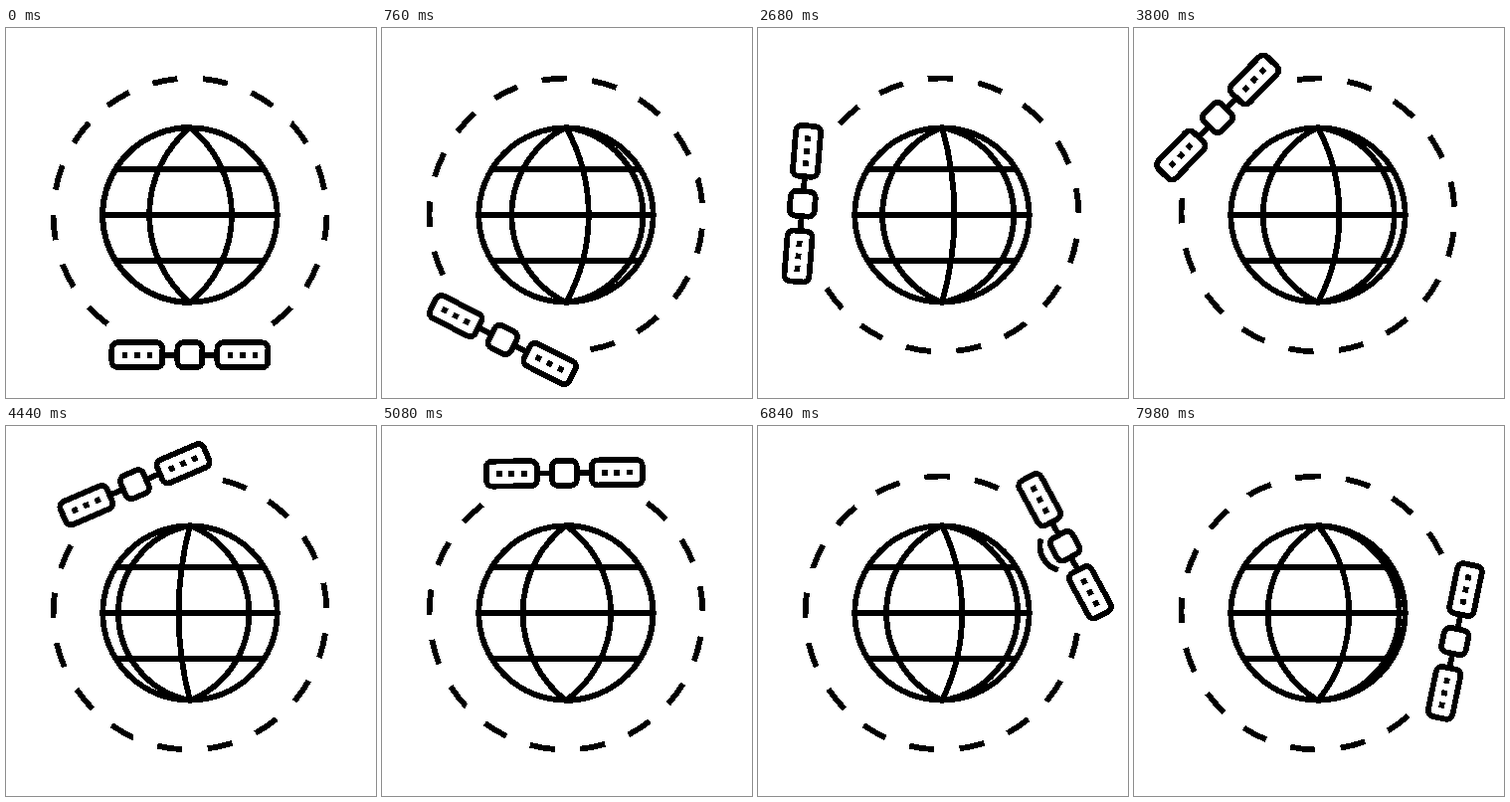
Animation, 372 px wide and 372 px high, one loop 8 s. Source, as an HTML page:

```html
<!DOCTYPE html>
<html lang="en">
<head>
<meta charset="utf-8">
<title>Satellite orbit</title>
<style>
  html, body { margin: 0; width: 100%; height: 100%; overflow: hidden; background: #fff; }
  svg {
    display: block; width: 100%; height: 100%;
    fill: none; stroke: #000; stroke-width: 5.8; shape-rendering: crispEdges;
  }
</style>
</head>
<body>
<svg viewBox="-185 -188 372 372">
  <circle r="87.7"/>
  <path d="M-75-46H75M-88 0H88M-75 46H75"/>
  <path id="meridians"/>
  <g id="orbit">
    <path d="M-82.9 109.7A137.5 137.5 0 1 1 82.9 109.7" pathLength="27" stroke-dasharray="1 1"/>
    <g transform="translate(0 140.7)">
      <path id="signal" d="M-18-17.4A25 25 0 0 1 18-17.4"/>
      <rect x="-12.5" y="-12.5" width="25" height="25" rx="6"/>
      <path d="M-27.5 0H-12.5M12.5 0H27.5"/>
      <g id="panel" transform="translate(-53)">
        <rect x="-25.5" y="-12.5" width="51" height="25" rx="6"/>
        <path d="M-15.4 0h5.8M-2.9 0h5.8M9.6 0h5.8"/>
      </g>
      <use href="#panel" x="106"/>
    </g>
  </g>
</svg>
<script>
const LOOP = 8000, ORBIT = 10200, SPIN = 1018, RADIUS = 88;
const [meridians, orbit, signal] =
  ['meridians', 'orbit', 'signal'].map(id => document.getElementById(id));
const clamp = (v, lo, hi) => Math.min(hi, Math.max(lo, v));

// Each half turn morphs the meridians' equator offsets from one pose to the next.
const HALF_TURNS = [
  { from: [-88, -41, 42], to: [-66, 0, 66] },
  { from: [-66, 0, 66], to: [-43, 46, 89] },
];

// Circular arc from pole to pole through (x, 0).
function meridian(x) {
  const bulge = Math.max(Math.abs(x), 0.05);
  const r = (RADIUS ** 2 + bulge ** 2) / (2 * bulge);
  return `M0 ${-RADIUS}A${r} ${r} 0 0 ${x > 0 ? 1 : 0} 0 ${RADIUS}`;
}

function draw(now) {
  const t = now % LOOP;
  orbit.setAttribute('transform', `rotate(${360 * t / ORBIT})`);

  const halves = 2 * t / SPIN;
  const { from, to } = HALF_TURNS[Math.floor(halves) % 2];
  meridians.setAttribute('d',
    from.map((x, i) => meridian(x + (to[i] - x) * (halves % 1))).join(''));

  const pulse = t % (ORBIT / 2);
  signal.setAttribute('opacity', clamp(Math.min(pulse - 1240, 2400 - pulse) / 400, 0, 1));
}

const start = performance.now();
function tick() {
  draw(performance.now() - start);
  requestAnimationFrame(tick);
}
tick();
</script>
</body>
</html>
```
